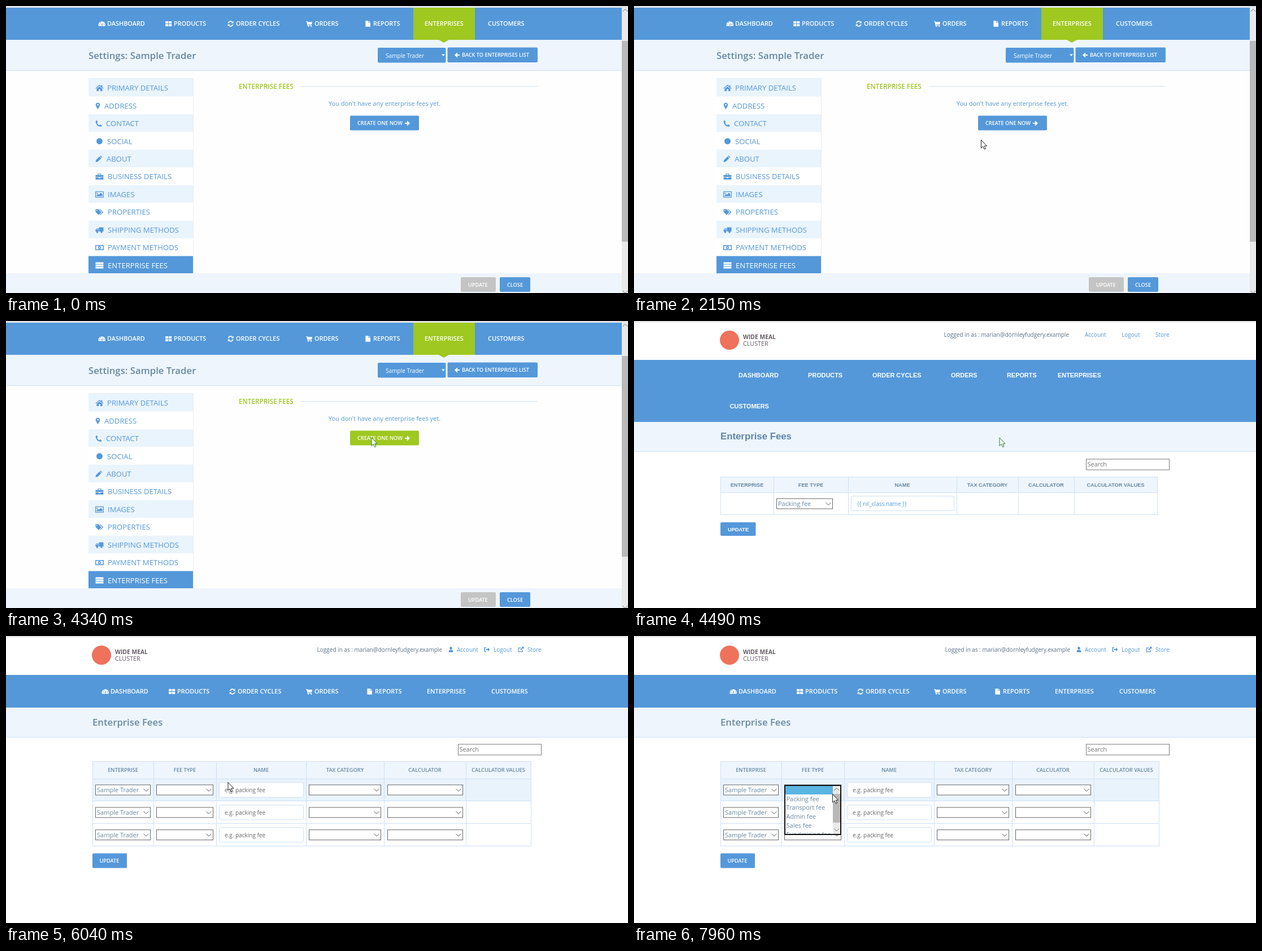
An HTML page that plays this animation: 1101x509 px, repeating every 8000 ms.

```html
<!DOCTYPE html>
<html lang="en">
<head>
<meta charset="utf-8">
<title>Enterprise fees</title>
<style>
html, body { margin: 0; width: 100%; height: 100%; overflow: hidden; background: #fff; }
svg { display: block; width: 100%; height: 100%; font-family: "Open Sans", "Noto Sans", sans-serif; }
.plain { font-family: "Liberation Sans", Arial, sans-serif; }
</style>
</head>
<body>
<svg id="stage" viewBox="0 0 1101 509"></svg>
<script>
const BLUE = '#5498da', GREEN = '#9fc820', PALE = '#eef5fd', LINE = '#cee1f4',
      STEEL = '#6788a2', SHOP = 'Sample Trader';

const ICONS = {
  gauge: 'M-6 4A6.3 6.3 0 1 1 6 4ZM-1 2.5L1.2-2.5 1 3ZM-4.5 0h1.5v1.5h-1.5zM3 0h1.5v1.5h-1.5zM-3-3h1.5v1.5h-1.5z',
  grid: 'M-5.5-4.5h5v4h-5zM.5-4.5h5v4h-5zM-5.5.5h5v4h-5zM.5.5h5v4h-5z',
  cycle: 'M-5-1A5 5 0 0 1 3.6-3.6L5-5V-1H1L2.4-2.4A3.3 3.3 0 0 0-3.2-1ZM5 1A5 5 0 0 1-3.6 3.6L-5 5V1H-1L-2.4 2.4A3.3 3.3 0 0 0 3.2 1Z',
  cart: 'M-5.5-4.5h2.3l.4 1.2h8.3l-1 4.6h-6.6l.2.9h6v1.1h-7l-1.7-6.7h-.9zM-2.5 3.2h2v2h-2zM2.5 3.2h2v2h-2z',
  file: 'M-4.3-5.3h4.8v3.6h3.8v7h-8.6zM1.3-5.3l3 2.8h-3z',
  home: 'M-7 .3L0-5.8 3-3.2V-5h2v3.5L7 .3 6.2 1.2 0-4-6.2 1.2zM-5 1.5L0-2.6 5 1.5V5.5H1.5V2h-3v3.5H-5z',
  pin: 'M0 6.5L-3.4 0A3.8 3.8 0 1 1 3.4 0zM-1.5-2a1.5 1.5 0 1 0 3 0a1.5 1.5 0 1 0-3 0z',
  phone: 'M-5.5-3.5Q-5-5.5-3-5.5L-1.5-2.5-3-1Q-1.5 2 1 3L2.5 1.5 5.5 3Q5.5 5.5 3.5 5.5Q-4 5-5.5-3.5z',
  dot: 'M-5.5 0a5.5 5.5 0 1 0 11 0a5.5 5.5 0 1 0-11 0z',
  pencil: 'M-5.5 5.5L-4.8 2 1.5-4.2 4.5-1.2-1.8 5zM2.2-5L3.2-5.8Q4-6 6-3.4L5.2-2z',
  bag: 'M-7-3h4V-5.5h6V-3h4V.5H-7zM-1.8-3h3.6v-1.4h-3.6zM-7 1.3h5.5v1.2h3V1.3H7V5H-7z',
  image: 'M-7.5-5.5h15v11h-15zM-6.2-4.2v8.4h12.4v-8.4zM-5 3V1.5L-2.5-1-1 .5 2.5-3 5-.5V3zM-5-3h2v2h-2z',
  tags: 'M-7-5.5h5L3.5 0-1.5 5-7-.5zM-5.5-4h1.6v1.6h-1.6zM-.5-5.5h1.5L6.8.2 1.8 5.2.9 4.3 5 .2z',
  truck: 'M-1-4.5h8v7.5h-8zM-7 3V-.3L-4.8-2.5H-1.7V3zM-5.8 0h2.6v-1.4h-1.2zM-5.5 3h3v2.5h-3zM2 3h3v2.5h-3z',
  money: 'M-7.5-4.5h15v9h-15zM-6-3v6H6v-6zM-2.5 0a2.5 2.8 0 1 0 5 0a2.5 2.8 0 1 0-5 0zM-.6-1.6h1.2v3.2h-1.2z',
  list: 'M-7-5.5h14v3h-14zM-7-1.5h14v3h-14zM-7 2.5h14v3h-14z',
  right: 'M-4.5-1H.6L-1.3-3 0-4.3 4.5 0 0 4.3-1.3 3 .6 1H-4.5z',
  left: 'M4.5-1H-.6L1.3-3 0-4.3-4.5 0 0 4.3 1.3 3-.6 1H4.5z',
  user: 'M-2.3-2.6a2.3 2.5 0 1 0 4.6 0a2.3 2.5 0 1 0-4.6 0zM-4 4.8Q-4 .6 0 .6T4 4.8z',
  exit: 'M-5-4h3.5v1.2h-2v5.6h2v1.2H-5zM-2-1H1.5v-2.3L5 0 1.5 3.3V1H-2z',
  open: 'M-5-3.5H0v1.2h-3.8v5.6h5.8V1h1.2v3.5H-5zM1-5h4v4L3.7-2.3 0 1.3-1.2.1 2.4-3.6z'
};

// Boxes are given by their edges; text by the middle of its capitals.
const box = (x, y, x2, y2, fill, more = '') =>
  `<rect x="${x}" y="${y}" width="${x2 - x}" height="${y2 - y}" fill="${fill}" ${more}/>`;
const frame = (x, y, x2, y2, color, more = '') =>
  box(x + .5, y + .5, x2 - .5, y2 - .5, '#fff', `stroke="${color}" ${more}`);
const text = (s, x, y, size, fill, weight = 400, anchor = 'start') =>
  `<text x="${x}" y="${y + size * .357}" font-size="${size}" fill="${fill}" font-weight="${weight}" text-anchor="${anchor}">${s}</text>`;
const icon = (name, x, y, fill = '#fff') =>
  `<path d="${ICONS[name]}" transform="translate(${x} ${y})" fill="${fill}" fill-rule="evenodd"/>`;
const chevron = (x, y, color = '#555', up = 1) =>
  `<path d="M${x - 4.5} ${y - 2 * up}l4.5 ${4.5 * up} 4.5 ${-4.5 * up}" fill="none" stroke="${color}"/>`;
const group = (id, body, more = '') => `<g id="${id}" ${more}>${body}</g>`;
const button = (s, x, y, x2, y2, tx, fill = BLUE, color = '#fff') =>
  box(x, y, x2, y2, fill, 'rx="2"') + text(s, tx, (y + y2) / 2 + .3, 9.2, color, 600);
const select = (s, x, x2, y) =>
  frame(x, y - 9.5, x2, y + 9.5, '#666') + text(s, x + 3, y, 11, STEEL) + chevron(x2 - 8, y);

const MENU = ['DASHBOARD', 'PRODUCTS', 'ORDER CYCLES', 'ORDERS', 'REPORTS', 'ENTERPRISES', 'CUSTOMERS'];
const MENU_ICONS = ['gauge', 'grid', 'cycle', 'cart', 'file'];
const menu = (y, xs) => MENU.map((s, i) =>
  text(s, xs[i], y, 10.9, '#fff', 600) +
  (MENU_ICONS[i] ? icon(MENU_ICONS[i], xs[i] - 9.3, y) : '')).join('');

function settingsPage() {
  const items = [
    ['home', 'PRIMARY DETAILS', 179], ['pin', 'ADDRESS', 174], ['phone', 'CONTACT', 177],
    ['dot', 'SOCIAL', 179], ['pencil', 'ABOUT', 178], ['bag', 'BUSINESS DETAILS', 180],
    ['image', 'IMAGES', 180], ['tags', 'PROPERTIES', 180], ['truck', 'SHIPPING METHODS', 180],
    ['money', 'PAYMENT METHODS', 180], ['list', 'ENTERPRISE FEES', 180]];
  const side = items.map(([name, s, x], i) => {
    const y = 145.5 + i * 31.45, last = i === 10, color = last ? '#fff' : BLUE;
    const bg = last ? BLUE : i % 2 ? '#fff' : '#eaf4fc';
    return box(146, y - 16.5, 331, y + 15, bg) + icon(name, x < 177 ? 162.5 : x < 179 ? 164 : 165.5, y, color) +
      text(s, x, y, 13.13, color);
  }).join('');
  return box(0, 0, 1101, 509, '#fefefe') + box(0, 0, 1101, 2.5, '#dcdfe2') +
    box(0, 3, 1090, 60, BLUE) + box(0, 60, 1090, 114, PALE) + box(0, 114, 1090, 115, LINE) +
    box(721, 3, 830, 60, GREEN) + `<path d="M766 60h18l-9 5z" fill="${GREEN}"/>` +
    menu(31.5, [179, 297, 407, 546, 650, 741, 853]) +
    text('Settings: ' + SHOP, 146, 88, 16.75, STEEL, 600) +
    box(658, 74, 778.5, 100.5, BLUE, 'rx="2"') + text(SHOP, 672, 88, 10.1, '#fff') +
    '<path d="M771 85.5h6l-3 3.5z" fill="#fff"/>' +
    button('BACK TO ENTERPRISES LIST', 781.5, 73.5, 941, 100, 807) + icon('left', 798.5, 87) +
    box(331, 128, 332, 474, '#ececec') + box(146, 128, 331, 129, '#e6eef5') + side +
    text('ENTERPRISE FEES', 412, 143, 11.75, GREEN, 600) + box(522, 142, 941, 143, LINE) +
    text("You don't have any enterprise fees yet.", 670, 173.5, 11, BLUE, 400, 'middle') +
    box(609, 194.5, 731, 220.5, BLUE, 'rx="2" id="create"') +
    text('CREATE ONE NOW', 622, 208, 9.2, '#fff', 600) + icon('right', 710.5, 208) +
    box(0, 474, 1090, 509, PALE) +
    button('UPDATE', 805, 481, 867, 507, 818, '#c4c4c4') + button('CLOSE', 874, 481, 928, 507, 887) +
    box(1090, 2, 1101, 509, '#e9e9e9') + box(1090, 62, 1101, 418, '#b9b9b9') +
    chevron(1096, 8, '#777', -1) + chevron(1096, 507, '#777');
}

const brand = box(0, 0, 1101, 509, '#fff') + box(0, 1, 1101, 2, '#c9c9c9') +
  '<circle cx="169" cy="34" r="17" fill="#ee725c"/>' +
  text('WIDE MEAL', 193, 28.5, 10.3, '#665c66', 700) + text('CLUSTER', 193, 39.8, 10.8, '#665c66');
const account = x => text('Logged in as : marian@dornleyfudgery.example', x, 24.5, 10, '#5a7186', 400, 'end') +
  text('Account', 798, 24.5, 10, BLUE) + text('Logout', 863, 24.5, 10, BLUE) + text('Store', 923, 24.5, 10, BLUE);
const search = y => frame(800, y - 10, 948, y + 10, '#777') + text('Search', 802.5, y, 11, '#757575');

const HEADS = ['ENTERPRISE', 'FEE TYPE', 'NAME', 'TAX CATEGORY', 'CALCULATOR', 'CALCULATOR VALUES'];
function table(cols, ys, size = 9.3) {
  const end = cols[6], bottom = ys[ys.length - 1];
  return box(cols[0], ys[0], end, ys[1], PALE) +
    HEADS.map((s, i) => text(s, (cols[i] + cols[i + 1]) / 2, (ys[0] + ys[1]) / 2 + .3, size, STEEL, 600, 'middle')).join('') +
    cols.map(x => box(x, ys[0], x + 1, bottom, LINE)).join('') +
    ys.map(y => box(cols[0], y, end + 1, y + 1, LINE)).join('');
}

function plainPage() {
  const xs = [185, 308, 422, 561, 660, 750, 169.5];
  return brand + account(770) +
    box(0, 69, 1101, 179, BLUE) + box(0, 179, 1101, 231, PALE) + box(0, 231, 1101, 232, LINE) +
    group('', MENU.map((s, i) => text(s, xs[i], i < 6 ? 96.5 : 151.5, 10.9, '#fff', 700)).join('') +
      text('Enterprise Fees', 153, 204.5, 16.8, '#5f86a8', 700) +
      table([153, 247, 379, 571, 680, 779, 926], [276, 304, 343], 9.2) +
      button('UPDATE', 153, 357, 215.5, 381, 166), 'class="plain"') +
    search(254.5) + select('Packing fee', 252, 352, 324) +
    frame(384, 310, 567, 337, LINE, 'rx="2"') + text('{{ nil_class.name }}', 395, 324, 10, BLUE);
}

function feesPage() {
  const cols = [153, 261, 372, 531, 669, 814, 929];
  const rows = [273, 313, 352.7].map(y =>
    select(SHOP, 158, 256, y) + select('', 266, 367, y) +
    frame(377, y - 13.5, 527, y + 13.5, LINE, 'rx="2"') + text('e.g. packing fee', 387, y + .5, 10, '#666') +
    select('', 536, 664, y) + select('', 675, 809, y)).join('');
  return brand + account(772) + icon('user', 787.5, 24, BLUE) + icon('exit', 851.5, 24, BLUE) + icon('open', 911.5, 24, BLUE) +
    box(0, 69, 1101, 127, BLUE) + box(0, 127, 1101, 179, PALE) + box(0, 179, 1101, 180, LINE) +
    menu(98.5, [185, 303, 410, 546, 653, 745, 859]) +
    text('Enterprise Fees', 153, 153, 16.75, STEEL, 600) + search(201.5) +
    group('empty', table([153, 275, 371, 448, 593, 725, 918], [222, 253]) + button('UPDATE', 153, 265.5, 214, 292, 165.5)) +
    group('filled', box(153, 253, 930, 293, '#e9f3fc', 'id="hover"') +
      table(cols, [222, 253, 292, 332, 372]) + rows + button('UPDATE', 153, 385.5, 214, 411.5, 165.5));
}

function dropdown() {
  const options = ['Packing fee', 'Transport fee', 'Admin fee', 'Sales fee', 'Fundraising fee'];
  return group('drop',
    box(266, 264, 367, 353, '#fff') + box(268, 266, 352, 281, '#5ab5e2', 'id="pick"') +
    options.map((s, i) => text(s, 269.5, 288.7 + i * 15.75, 11, STEEL)).join('') +
    box(352, 266, 365, 351, '#eaeaea') + box(352, 280, 365, 331, '#b8b8b8') +
    chevron(358.5, 272, '#777', -1) + chevron(358.5, 343.5, '#777'), 'clip-path="url(#slide)"') +
    '<rect id="rim" x="267" y="265" width="99" fill="none" stroke="#111" stroke-width="2"/>';
}

const stage = document.getElementById('stage');
stage.innerHTML =
  '<defs><clipPath id="slide"><rect id="slot" x="266" y="264" width="101"/></clipPath></defs>' +
  group('settings', settingsPage()) + group('plain', plainPage()) + group('fees', feesPage()) +
  group('popup', dropdown()) +
  group('status', box(-1, 495, 357, 510, '#000', 'opacity=".12"') +
    box(-.5, 493.5, 354.5, 510, '#f3f3f3', 'stroke="#b5b5b5"') +
    text('https://widemealcluster.example/admin/enterprise_fees?enterprise_id=304718', 2.5, 503, 9.5, '#444')) +
  '<circle id="halo" r="10" fill="#f0e400" opacity=".65"/>' +
  group('cursor',
    '<path id="arrow" d="M0 0V14.5L3.3 11.4 5.6 16.6 7.9 15.6 5.7 10.6H10Z" fill="#fff"/>' +
    '<path id="hand" d="M-1.5 1.5Q0-.5 1.5 1.5V7l2-.3 1.3 1 1.7 0 1 1 1.3.5V14.5L6.5 17.5V20H-1.5V18L-5 12.5Q-5 10.5-3 11L-1.5 12.5Z" fill="#fff" stroke="#222"/>');

const el = {};
stage.querySelectorAll('[id]').forEach(e => { if (e.id) el[e.id] = e; });
const show = (id, on) => el[id].setAttribute('display', on ? 'inline' : 'none');
const set = (id, name, value) => el[id].setAttribute(name, value);
const ramp = (t, a, b) => Math.max(0, Math.min(1, (t - a) / (b - a)));

// Pointer stops: time, x, y
const PATH = [
  [360, -12, 470], [600, 330, 440], [910, 790, 510], [1770, 570, 510], [2150, 614.5, 237.5],
  [2230, 614.5, 237.5], [2550, 647.5, 207], [4030, 647, 207], [5580, 647, 207], [6040, 393, 259.5],
  [6110, 393, 259.5], [6350, 358, 270], [6580, 360, 273], [7820, 360, 273], [7960, 351.5, 280.5]];

function pointer(t) {
  let i = 0;
  while (i < PATH.length - 2 && t >= PATH[i + 1][0]) i++;
  const [a, x, y] = PATH[i], [b, x2, y2] = PATH[i + 1], k = ramp(t, a, b);
  return [x + (x2 - x) * k, y + (y2 - y) * k];
}

function draw(t) {
  const [x, y] = pointer(t);
  const over = t > 2230 && t < 4490 && y < 220;
  show('settings', t < 4490);
  show('plain', t >= 4490 && t < 4640);
  show('fees', t >= 4640);
  show('empty', t < 4720);
  show('filled', t >= 4720);
  show('hover', t > 5580 && y > 253);
  set('create', 'fill', over ? GREEN : BLUE);

  show('status', over && t < 4340);
  set('status', 'opacity', 1 - ramp(t, 4130, 4340));

  const height = 19 + 70 * ramp(t, 6970, 7420);
  show('popup', t >= 7040);
  set('slot', 'height', height);
  set('rim', 'height', height - 2);
  set('pick', 'fill', t < 7880 ? '#48a9dc' : '#5ab5e2');

  const hand = over && t < 4030;
  show('cursor', t >= 360 && t < 910 || t >= 1770);
  set('cursor', 'transform', `translate(${x} ${y})`);
  show('hand', hand);
  show('arrow', !hand);
  set('arrow', 'stroke', t >= 4030 && t < 5580 ? '#2f7a2a' : '#222');
  show('halo', t >= 3480 && t < 3710 || t >= 7040 && t < 7270);
  set('halo', 'cx', x);
  set('halo', 'cy', y);
}

function tick() {
  draw(performance.now() % 8000);
  requestAnimationFrame(tick);
}
tick();
</script>
</body>
</html>
```
